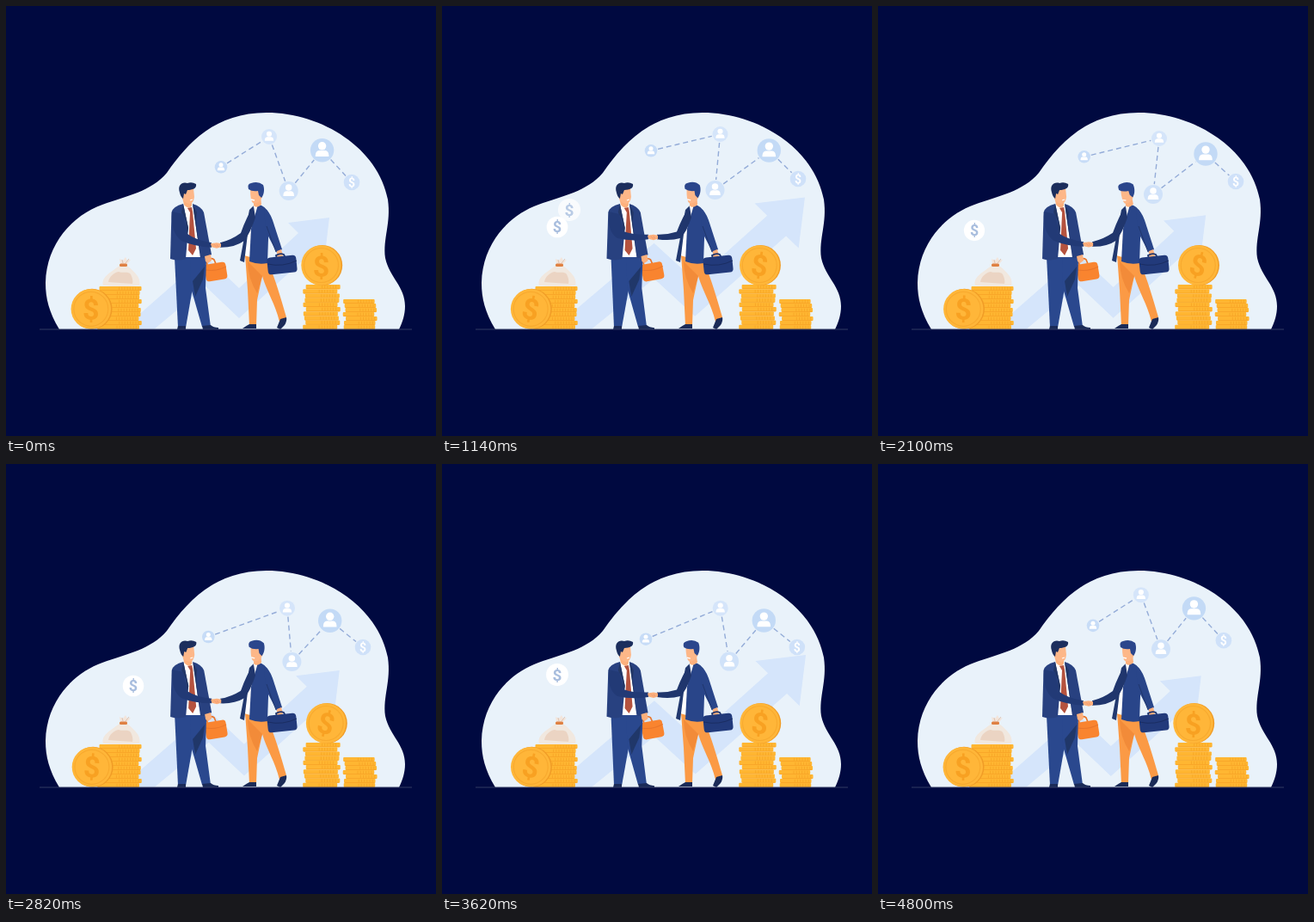
These frames come from a looping animation (500 px wide and 500 px high, 4840 ms). An HTML page:

```html
<!DOCTYPE html>
<html lang="en">
<head>
<meta charset="utf-8">
<title>Business deal</title>
<style>
html, body { margin: 0; width: 100%; height: 100%; overflow: hidden; background: #000940; }
svg { display: block; width: 100%; height: 100%; }
text { font-family: Roboto, "Open Sans", sans-serif; font-weight: 700; text-anchor: middle; }
</style>
</head>
<body>
<svg viewBox="0 0 500 500">
  <defs>
    <clipPath id="floor"><rect width="500" height="375.5"/></clipPath>
  </defs>
  <path fill="#e9f2fa" d="M62 376C50 356 46 340 46 322C47 276 78 243 112 231C142 220 168 216 187 194C212 158 244 124 303 124C368 124 433 166 444 225C448 253 438 270 441 293C446 316 464 326 464 349C464 359 461 368 457 376Z"/>
  <g clip-path="url(#floor)">
    <path id="arrow" fill="#d5e5fb" d="M135 376L232 291L271 328L340 264L328 252L376 246L370 296L358 284L271 363L232 326L172 376Z"/>
  </g>
  <g id="links" stroke="#94acd8" stroke-width="1.4" stroke-dasharray="6 4"></g>
  <g id="nodes"></g>
  <g id="puffs"></g>

  <g id="stacks"></g>
  <path fill="#f1e8df" d="M113 325C110 315 123 309 132 302H141C148 308 158 316 155 325Q134 327 113 325Z"/>
  <path fill="#ebd4c3" d="M119 321C120 315 125 310 131 309C137 311 142 308 145 312C147 316 148 320 147 323Q132 322 119 321Z"/>
  <path fill="#f3e5db" d="M133 300L132 294L136 296L139 292L141 296L145 295L141 300Z"/>
  <path fill="none" stroke="#d9b9a5" stroke-width=".8" d="M136 299L135 295M139 299L143 294"/>
  <rect x="132" y="299.5" width="9" height="3.4" rx="1.5" fill="#df8042"/>
  <g id="coinL"></g>
  <g id="coinR"></g>

  <g id="manL">
    <g id="caseL">
      <path fill="none" stroke="#e9762b" stroke-width="1.7" d="M234 301L233 296Q238 292 242 295L244 300"/>
      <rect x="231.5" y="299" width="25" height="20" rx="4" fill="#f9842f" transform="rotate(-9 244 309)"/>
      <path stroke="#e9762b" d="M232 307Q245 309 256 303" fill="none"/>
    </g>
    <path fill="#2a488e" d="M196 292H219L217 328L209 374H200Z"/>
    <path fill="#2a488e" d="M214 292H233L232 328L238 373H228L215 328Z"/>
    <path fill="#203769" d="M217 320L231 303L229 318L220 338Z"/>
    <path fill="#1b2b58" d="M200 372H209V376H199ZM228 372L238 371Q241 374 247 374V376H229Z"/>
    <path fill="#fff" d="M206 231L218 230L227 292H208Z"/>
    <path fill="#fdb07c" d="M205 222L216 225V232Q213 238 207 231Z"/>
    <path fill="#b5533f" d="M211 235L216 234L217 239L221 282L217 290L212 284L214 240Z"/>
    <path fill="#284180" d="M206 230Q194 233 192.5 240L191 294Q201 297 209 294L212 258Z"/>
    <path fill="#284180" d="M217 230Q227 233 230 240L239 289L233 293H226Z"/>
    <path fill="#223767" d="M206 230L204 240L209 250L210 270L212 258ZM217 230L222 240L221 250L226 291Z"/>
    <path fill="#fdb07c" d="M231 291L238 289L239 296L235 299L232 297Z"/>
    <path fill="#fdb788" d="M204 212H218L219 222Q218 230 213 230Q206 229 204 221Z"/>
    <path fill="#1c2e5d" d="M202 217C199 208 205 204 211 206Q216 204 221 207C222 212 217 214 211 214L209 219L207 218L206 224Q203 222 202 217Z"/>
    <path stroke="#fff" stroke-width="1.2" d="M214 226L217 225"/>
  </g>

  <g id="manR">
    <path fill="#fb9a45" d="M278 289H297L298 314L292 342L291 372H283L281 330Z"/>
    <path fill="#fb9a45" d="M283 296H304C313 317 320 341 326 362L318 367C313 346 304 334 298 314Z"/>
    <path fill="#f28b39" d="M281 297L298 314L292 334Q281 316 281 297Z"/>
    <path fill="#1b2b58" d="M283 370H291V375H275Q279 372 283 370ZM319 364L326 362Q327 366 324 371L319 376L315 374Z"/>
    <path fill="#fff" d="M287 231L294 231L292 250L284 292L277 290Z"/>
    <path fill="#294589" d="M293 231Q302 232 306 242L304 299Q293 301 283 297L285 259Z"/>
    <path fill="#22396f" d="M288 232L283 237L272 296L277 298L282 257Z"/>
    <path fill="#294589" d="M300 235Q306 238 310 249L321 283L315 287L302 262Z"/>
    <path fill="none" stroke="#20366d" d="M303 256L314 286"/>
    <path fill="#fdb07c" d="M315 285L320 283L322 290L319 294L315 291Z"/>
    <path fill="none" stroke="#20366d" stroke-width="1.8" d="M315 294L314 290Q319 287 323 289L325 293"/>
    <rect x="304" y="291" width="34" height="20" rx="4" fill="#223a7b" transform="rotate(-6 321 301)"/>
    <path fill="none" stroke="#1a2d62" d="M304 300Q322 304 338 296"/>
    <g id="headR">
      <path fill="#fdb07c" d="M288 223L296 221L297 231Q291 236 288 232Z"/>
      <path fill="#fdb788" d="M284 213H297L298 222Q294 231 287 229Q284 226 284 213Z"/>
      <path fill="#2b468c" d="M282 213Q280 207 285 206Q293 203 299 208C301 213 300 220 297 223L294 220L293 215Q286 216 282 213Z"/>
      <path stroke="#fff" stroke-width="1.3" d="M285 225L289 226"/>
    </g>
  </g>

  <path id="armR" fill="#20366d"/>
  <path id="armL" fill="#223a76"/>
  <g id="hands">
    <path fill="#fdb07c" d="M-6 -2L1 -3L6 -2L6 2L1 3.4L-5 2Z"/>
    <path fill="none" stroke="#ea946e" stroke-width=".8" d="M-2 -1L1 2M1 -1L3 2"/>
  </g>
  <path stroke="#323b62" d="M39 376H472"/>
</svg>
<script>
const LOOP = 4840, HALF = LOOP / 2;
const el = id => document.getElementById(id);
const place = (id, value) => el(id).setAttribute("transform", value);
const mix = (a, b, k) => a + (b - a) * k;

// Smooth closed curve through [time, value] keys.
function cycle(keys, period, t) {
  const n = keys.length;
  const key = i => {
    const w = Math.floor(i / n), k = keys[i - w * n];
    return [k[0] + w * period, k[1]];
  };
  t %= period;
  let i = n - 1;
  while (keys[i][0] > t) i--;
  const [a, b, c, d] = [key(i - 1), key(i), key(i + 1), key(i + 2)];
  const h = c[0] - b[0], s = (t - b[0]) / h;
  const m0 = (c[1] - a[1]) / (c[0] - a[0]) * h;
  const m1 = (d[1] - b[1]) / (d[0] - b[0]) * h;
  const s2 = s * s, s3 = s2 * s;
  return (2 * s3 - 3 * s2 + 1) * b[1] + (s3 - 2 * s2 + s) * m0 +
    (3 * s2 - 2 * s3) * c[1] + (s3 - s2) * m1;
}

// Straight steps between keys, held at both ends.
function ramp(keys, t) {
  if (t <= keys[0][0]) return keys[0][1];
  for (let i = 1; i < keys.length; i++) {
    const [t0, v0] = keys[i - 1], [t1, v1] = keys[i];
    if (t <= t1) return mix(v0, v1, (t - t0) / (t1 - t0));
  }
  return keys[keys.length - 1][1];
}

const times = [0, 1140, 2100, 2820, 3620, 4180];
const track = values => values.map((v, i) => [times[i], v]);

const nodes = [
  { r: 7.3, fill: "#c7dcf7", x: [250, 243, 239.7, 235.3, 237, 244.7], y: [187.3, 168.3, 175.3, 201, 203.7, 194] },
  { r: 9, fill: "#d5e5fa", x: [306, 323.5, 327, 327, 323.7, 313.3], y: [152, 149, 154, 167.7, 167.7, 158] },
  { r: 11, fill: "#d0e2f9", x: [328.7, 317.5, 320, 332.4, 334, 331], y: [215, 214, 219, 230, 229.6, 221] },
  { r: 13.7, fill: "#c3daf6", x: [367.6, 380.3, 381, 376.7, 374.3, 370.3], y: [167.7, 168, 172, 182.2, 182, 173.3] },
  { r: 9.3, fill: "#cfe1f9", x: [402, 414, 416, 415, 412.8, 406.2], y: [205, 201, 204, 213, 213, 208], money: true }
].map(n => ({ ...n, x: track(n.x), y: track(n.y) }));

const person = r => `<g transform="scale(${r / 14})" fill="#fff">
  <circle cy="-5" r="4.8"/><path d="M-8 7.5C-8 -1 -3 .5 0 .5C3 .5 8 -1 8 7.5Z"/></g>`;
const dollar = (size, fill) => `<text y="${size * .355}" font-size="${size}" fill="${fill}">$</text>`;

el("nodes").innerHTML = nodes.map((n, i) => `<g id="node${i}"><circle r="${n.r}" fill="${n.fill}"/>
  ${n.money ? dollar(14, "#fff") : person(n.r)}</g>`).join("");
el("links").innerHTML = nodes.slice(1).map((n, i) => `<line id="link${i}"/>`).join("");

const puffs = [
  { x: 148, y: [[0, 303], [150, 276], [400, 258], [1140, 237], [1220, 235]],
    show: [[30, 0], [150, 1], [1000, 1], [1140, .75], [1200, 0]] },
  { x: 134, y: [[860, 303], [1140, 257], [1200, 245], [1400, 240], [1650, 236]],
    show: [[880, 0], [980, 1], [1400, 1], [1650, 0]] },
  { x: 112, y: [[1480, 303], [1620, 281], [1760, 268], [2100, 261], [2340, 256]],
    show: [[1500, 0], [1620, 1], [2140, 1], [2320, 0]] }
];
el("puffs").innerHTML = puffs.map((p, i) =>
  `<g id="puff${i}"><circle r="12.3" fill="#fff"/>${dollar(18, "#a9bede")}</g>`).join("");

function stack(x, top, width, seed) {
  const count = Math.round((376 - top) / 5), h = (376 - top) / count;
  let out = "";
  for (let i = 0; i < count; i++) {
    const shift = Math.sin(i * 2.4 + seed) * 1.8, left = x + shift, y = top + i * h;
    out += `<rect x="${left}" y="${y}" width="${width}" height="${h}" rx="1" fill="#ffb632"/>
      <path stroke="#f6a326" stroke-width=".8" fill="none" d="M${left + 1} ${y + h - .4}h${width - 2}"/>
      <path stroke="#f8a828" stroke-width="${h - 1.5}" stroke-dasharray="1 2.2" d="M${left + width * .46} ${y + h / 2}h${width * .48}"/>`;
  }
  return out;
}
el("stacks").innerHTML = stack(107, 326, 49, 1) + stack(347, 324, 40, 2) + stack(393.5, 341, 36.5, 4);

const coin = id => {
  el(id).innerHTML = `<circle cx="1.2" r="23.5" fill="#f09c26"/><circle r="23.2" fill="#ffb639"/>
    <circle r="20" fill="none" stroke="#f8aa2f" stroke-width="1.2"/><g id="${id}Mark">${dollar(34, "#f8a122")}</g>`;
};
coin("coinL");
coin("coinR");

const growth = [[0, 0], [400, .25], [1200, 1], [1760, .64], [2100, .11]];
const nod = track([0, .7, -2.4, .8, -.8, -.6]);

function drawNodes(t) {
  const at = nodes.map(n => [cycle(n.x, LOOP, t), cycle(n.y, LOOP, t)]);
  at.forEach((p, i) => {
    place("node" + i, `translate(${p})`);
    if (!i) return;
    const q = at[i - 1], dx = p[0] - q[0], dy = p[1] - q[1], len = Math.hypot(dx, dy);
    const a = (nodes[i - 1].r + 1) / len, b = 1 - (nodes[i].r + 1) / len;
    const ends = { x1: q[0] + dx * a, y1: q[1] + dy * a, x2: q[0] + dx * b, y2: q[1] + dy * b };
    for (const k in ends) el("link" + (i - 1)).setAttribute(k, ends[k]);
  });
}

function drawPuffs(t) {
  puffs.forEach((p, i) => {
    const y = ramp(p.y, t), out = Math.min(1, (303 - y) / 35);
    const size = Math.min(1.06, 1 + (258 - y) * .004);
    place("puff" + i, `translate(${mix(134, p.x, out)} ${y}) scale(${size})`);
    el("puff" + i).setAttribute("opacity", ramp(p.show, t));
  });
}

function drawArms(u) {
  const x = 244 + u, y = 278.3 - 9.8 * u, lift = 3 * u;
  place("hands", `translate(${x} ${y})`);
  el("armL").setAttribute("d", `M${193 + u} 239Q${191 + u} 263 204 ${273 - lift}
    Q220 ${280 - 2 * lift} ${x - 5} ${y + 2.5}V${y - 3}Q220 ${272 - 2 * lift} 211 ${265 - lift}L206 242Z`);
  el("armR").setAttribute("d", `M288 233Q280 244 273 ${264 - lift / 2}Q262 ${272 - 2 * lift} ${x + 5} ${y - 3}
    V${y + 2.5}Q266 ${281 - 2.6 * lift} 277 ${273 - lift}Q284 264 290 246Z`);
}

function draw(now) {
  const t = Math.floor(now % LOOP / 20) * 20, half = t % HALF;
  const u = cycle(growth, HALF, half);
  const v = (1 - Math.cos(t / LOOP * 2 * Math.PI)) / 2;

  drawNodes(t);
  drawPuffs(half);
  place("arrow", `translate(165 376) scale(${1 + .223 * u} ${1 + .185 * u}) translate(-165 -376)`);

  place("coinL", `translate(${98.8 + 4.4 * u} 352.3)`);
  place("coinLMark", `rotate(${12 * u})`);
  place("coinR", `translate(${366.5 + 6 * v} 301.5)`);
  place("coinRMark", `rotate(${16 * v})`);

  place("manL", `rotate(${.35 * u} 218 376)`);
  place("caseL", `rotate(${-2 * u} 236 294)`);
  place("headR", `rotate(${cycle(nod, LOOP, t) * 2.4} 291 232)`);
  drawArms(u);
}

const start = performance.now();
function tick() {
  draw(performance.now() - start);
  requestAnimationFrame(tick);
}
tick();
</script>
</body>
</html>
```
